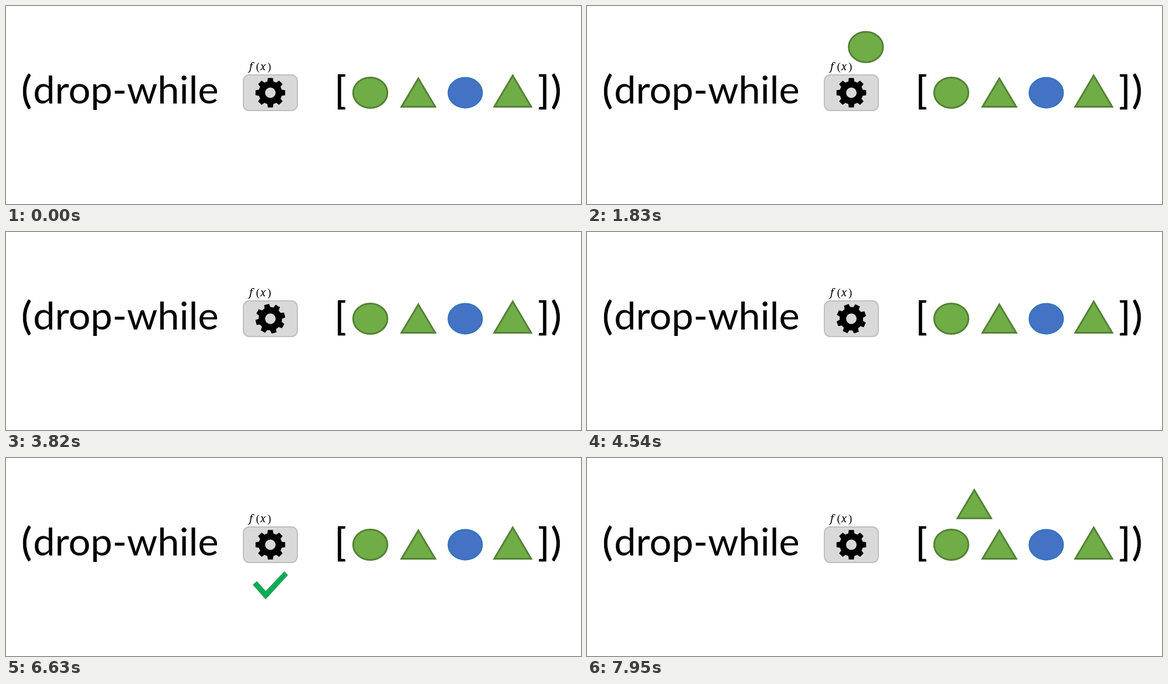
These frames come from a looping animation (981x339 px, 8 s). An HTML page:

```html
<!DOCTYPE html>
<html lang="en">
<head>
<meta charset="utf-8">
<title>drop-while</title>
<style>
  html, body { margin: 0; width: 100%; height: 100%; overflow: hidden; background: #fff; }
  svg { display: block; width: 981px; height: 339px; }
  .code { font: 66.6px Lato, Carlito, "Open Sans", sans-serif; }
  .mark { stroke: #000; stroke-width: .7; }
  .math { font: italic 18px "Noto Serif", "Liberation Serif", serif; }
  .math .up { font: 19px "Liberation Serif", serif; }
  .green { fill: #70ad47; stroke: #548235; stroke-width: 3; }
  .blue { fill: #4472c4; stroke: #2e75b6; stroke-width: 1.8; }
</style>
</head>
<body>
<svg viewBox="0 0 981 339">
  <defs>
    <ellipse id="disc" rx="29.2" ry="26"/>
    <path id="tri" d="M0-24 28.8 24.5H-28.8Z"/>
  </defs>

  <g class="code">
    <text class="mark" x="26.3" y="167">(</text>
    <text x="46.3" y="167">drop-while</text>
    <text class="mark" x="560.3" y="167">[</text>
    <text class="mark" x="907.3" y="167">]</text>
    <text class="mark" x="929.8" y="167">)</text>
  </g>

  <use href="#disc" class="green" x="621.5" y="148.5"/>
  <use href="#tri" class="green" x="703.5" y="148"/>
  <use href="#disc" class="blue" x="783.5" y="148.5"/>
  <path class="green" d="M864.5 119 896 172.5H833Z"/>

  <use id="ball" href="#disc" class="green"/>
  <use id="peak" href="#tri" class="green"/>
  <path id="check" d="M421.5 217 428 211.5 443 228.5 475 194.5 480.5 200.5 443 241.5Z"
        fill="#00b050" stroke="#3c7a5c"/>

  <rect x="405" y="118" width="92" height="61" rx="10" fill="#d9d9d9" stroke="#bfbfbf" stroke-width="2"/>
  <path id="gear" fill-rule="evenodd"/>
  <g class="math">
    <text x="415" y="110">f</text>
    <text x="426.5" y="110" class="up">(</text>
    <text x="433.5" y="110">x</text>
    <text x="446" y="110" class="up">)</text>
  </g>
</svg>
<script>
  const LOOP = 8000, MOVE = 2000;
  const BALL_AT = 645, SPIN_AT = 2652, CHECK_AT = 4655, FADE_AT = 6655, FADE = 500, PEAK_AT = 7155;
  const el = id => document.getElementById(id);
  const ball = el('ball'), peak = el('peak'), check = el('check'), gear = el('gear');

  const clamp = v => Math.min(1, Math.max(0, v));
  const ease = p => p < .5 ? .5 * (2 * p) ** 2.8 : 1 - .5 * (2 - 2 * p) ** 2.8;
  const part = (t, at, span = MOVE) => clamp((t - at) / span);

  // Motion advances in 50 ms steps with one longer step per cycle.
  function hold(t) {
    const cycle = 970, start = 510 + cycle * Math.floor((t - 510) / cycle);
    return start + 50 * Math.min(18, Math.floor((t - start) / 50));
  }

  // Symmetric cubic arch from x0 to x1.
  function arch(u, x0, x1, y, lean, lift) {
    const v = 1 - u, a = 3 * u * v * v, b = 3 * u * u * v;
    return [v ** 3 * x0 + a * (x0 + lean) + b * (x1 - lean) + u ** 3 * x1, y - lift * (a + b)];
  }

  // Eight tapered teeth on a round body with a hole.
  function gearPath() {
    const tooth = [[-15, 20], [-9.5, 25.6], [9.5, 25.6], [15, 20], [22.5, 20]];
    const pts = [];
    for (let turn = 0; turn < 360; turn += 45) {
      for (const [deg, r] of tooth) {
        const a = (turn + deg) * Math.PI / 180;
        pts.push((r * Math.sin(a)).toFixed(2) + ' ' + (-r * Math.cos(a)).toFixed(2));
      }
    }
    return 'M' + pts.join('L') + 'ZM-9 0a9 9 0 1 0 18 0a9 9 0 1 0-18 0Z';
  }
  gear.setAttribute('d', gearPath());

  function place(node, shown, [x, y]) {
    node.setAttribute('visibility', shown ? 'visible' : 'hidden');
    node.setAttribute('transform', `translate(${x} ${y})`);
  }

  function draw(now) {
    const t = hold(now % LOOP);
    place(ball, t > BALL_AT && t < SPIN_AT,
      arch(ease(part(t, BALL_AT)), 621.5, 449, 148.5, 25, 129));
    place(peak, t > PEAK_AT, arch(ease(part(t, PEAK_AT)), 703.5, 449, 148, 3, 119));
    place(check, t > CHECK_AT && t < FADE_AT + FADE,
      [0, -69.5 * (1 - ease(part(t, CHECK_AT)))]);
    check.setAttribute('opacity', 1 - part(t, FADE_AT, FADE));
    gear.setAttribute('transform', `translate(451 148.5) rotate(${360 * part(t, SPIN_AT)})`);
  }

  const begin = performance.now();
  (function tick() {
    draw(performance.now() - begin);
    requestAnimationFrame(tick);
  })();
</script>
</body>
</html>
```
